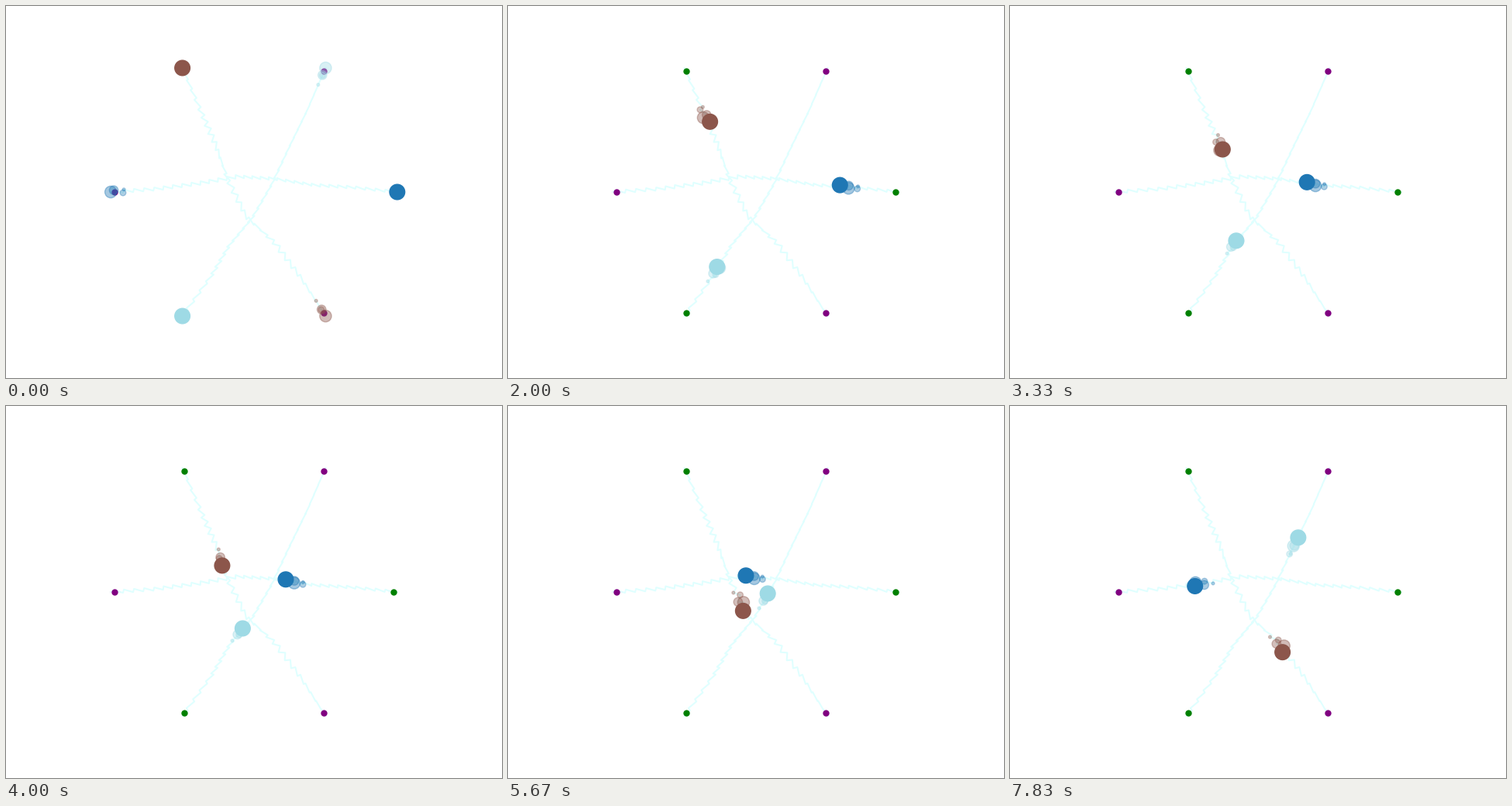
A matplotlib script that plays this animation: 640x480 px, repeating every 8 s.

```python
import numpy as np
import matplotlib.pyplot as plt
from matplotlib.animation import FuncAnimation

W, H, DPI = 640, 480, 100
FRAMES, INTERVAL = 48, 166.5
STEPS = 64          # length of a complete walk
SWING = 3.3         # sideways reach of each zigzag step
TRAIL = 4


def on_circle(radius, degrees):
    a = np.radians(degrees)
    return W / 2 + radius * np.cos(a), H / 2 + radius * np.sin(a)


def walk(start, via, swing_from, swing_to):
    """Cross the circle through evenly timed points, stepping from side to side.

    The side step points along an angle that eases from swing_from to swing_to.
    """
    ends = on_circle(184.8, start), on_circle(184.8, start + 180)
    x, y = np.array([ends[0], *via, ends[1]]).T
    t = np.linspace(0, 1, STEPS)
    knots = np.linspace(0, 1, len(x))
    ease = t * t * (3 - 2 * t)
    angle = np.radians(swing_from + (swing_to - swing_from) * ease)
    side = SWING * (-1) ** np.arange(STEPS)
    path = np.column_stack([np.interp(t, knots, x) + side * np.cos(angle),
                            np.interp(t, knots, y) + side * np.sin(angle)])
    path[[0, -1]] = ends
    return path


blue = walk(0, [(448, 234), (397, 231), (347, 223),
                (299, 220), (248, 229), (194, 236)], -145, -145)
brown = walk(240, [(251, 135), (270, 178), (286, 224),
                   (310, 272), (347, 306), (380, 350)], 50, -480)
pale = walk(120, [(265, 348), (288, 309), (318, 273),
                  (343, 230), (365, 183), (388, 136)], 156, 116)

paths = [blue, brown, pale]
colors = plt.get_cmap("tab20")(np.linspace(0, 1, 3))

fig = plt.figure(figsize=(W / DPI, H / DPI), dpi=DPI, facecolor="white")
ax = fig.add_axes([0, 0, 1, 1])
ax.set_xlim(0, W)
ax.set_ylim(H, 0)
ax.axis("off")

for path in paths:
    ax.plot(*path.T, color="lightcyan", lw=1.5, zorder=1)

for first, color in [(0, "green"), (60, "purple")]:
    ax.scatter(*on_circle(180, first + np.arange(0, 360, 120)),
               s=25, color=color, zorder=2)


def dots(size, alpha, z):
    return ax.scatter([0] * 3, [0] * 3, s=size, c=colors, alpha=alpha, zorder=z)


# The walkers come first, followed by ever smaller and fainter past positions.
layers = [dots(200, 1, 5)]
for k in range(TRAIL, 0, -1):
    layers.append(dots(7.5 * k * k, 0.3 + 0.025 * k, 3 + 0.1 * k))


def update(n):
    for back, layer in enumerate(layers):
        layer.set_offsets([path[(n - back) % STEPS] for path in paths])
    return layers


anim = FuncAnimation(fig, update, frames=FRAMES, interval=INTERVAL,
                     repeat=True, repeat_delay=0)
plt.show()
```
